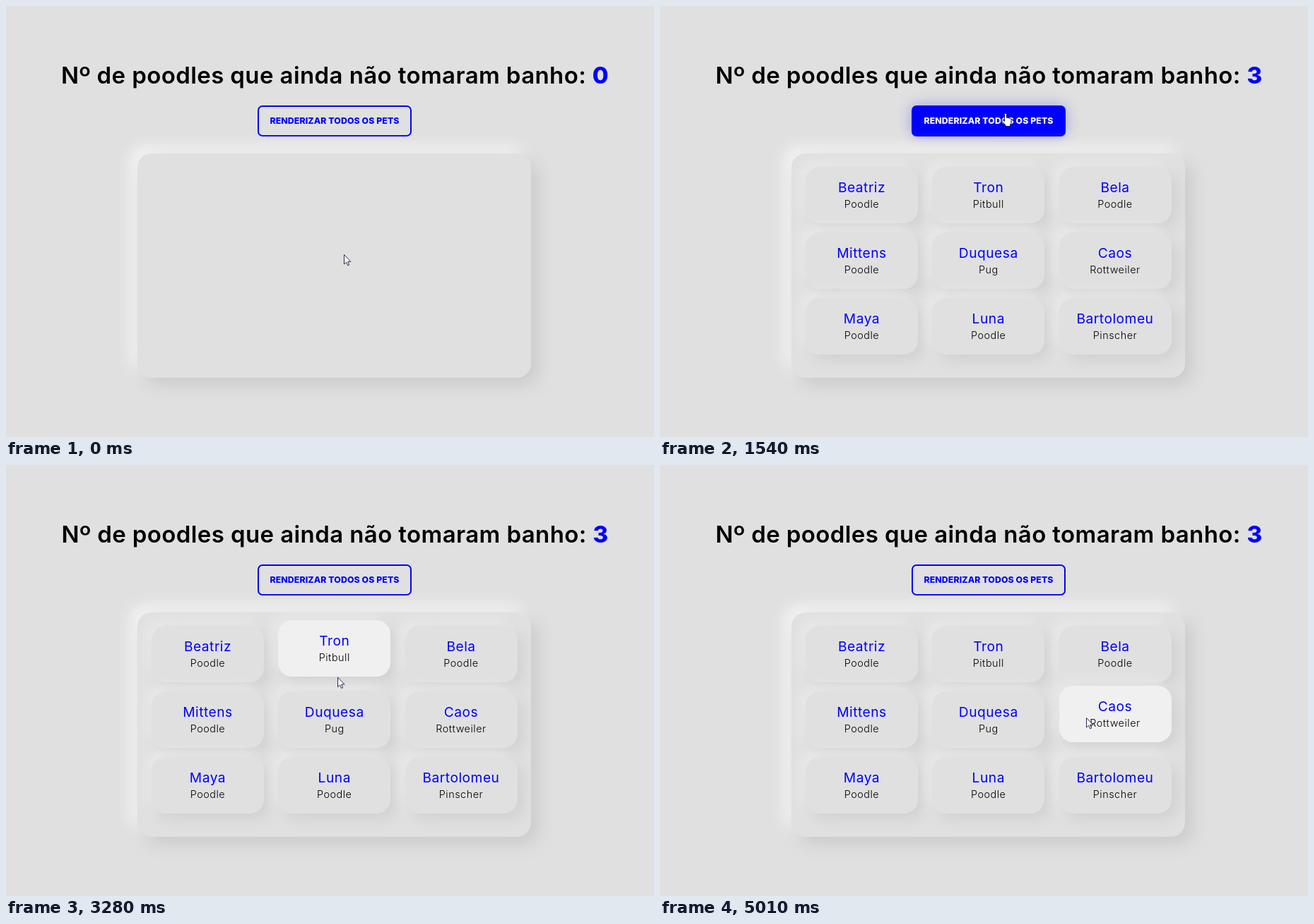
An HTML page for the animation above (5.27 s loop, 917 by 611 pixels).

```html
<!DOCTYPE html>
<html lang="pt-BR">
<head>
<meta charset="utf-8">
<title>Pets</title>
<style>
  html, body { margin: 0; width: 100%; height: 100%; overflow: hidden; background: #e0e0e0; }
  body { position: relative; font-family: Inter, "Open Sans", sans-serif; color: #000; }
  h1, button, .panel, .card, .pointer, .pointer svg { position: absolute; box-sizing: border-box; }
  h1 {
    left: 0; top: 78px; width: 931px; margin: 0; text-align: center; white-space: nowrap;
    font-size: 33px; font-weight: 600; line-height: 40px; letter-spacing: .4px;
  }
  h1 b { color: #00f; font-weight: 800; }
  button {
    left: 356px; top: 141px; width: 218px; height: 44px; padding: 0; border: 2px solid #00f;
    border-radius: 7px; background: transparent; color: #00f; white-space: nowrap;
    font: 800 12.3px/40px Inter, "Open Sans", sans-serif; letter-spacing: .1px;
  }
  .panel {
    left: 186px; top: 209px; width: 557px; height: 318px; border-radius: 20px; background: #e0e0e0;
    box-shadow: 10px 10px 24px #cacaca, -10px -10px 20px #f4f4f4;
  }
  .card {
    width: 159px; height: 80px; border-radius: 20px; background: #e0e0e0; text-align: center;
    box-shadow: 8px 8px 20px #d0d0d0, -8px -8px 16px #e9e9e9;
  }
  .name { margin-top: 17px; font-size: 19.2px; line-height: 24px; letter-spacing: .5px; color: #00f; }
  .breed { margin-top: 2px; font-size: 14.4px; line-height: 20px; letter-spacing: .5px; font-weight: 300; }
  .pointer { left: 0; top: 0; }
  .pointer svg { left: 0; top: 0; overflow: visible; }
  .pointer path { fill: #fff; stroke: #14143c; stroke-width: .9; stroke-linejoin: round; }
</style>
</head>
<body>
<h1 id="before">Nº de poodles que ainda não tomaram banho: <b>0</b></h1>
<h1 id="after">Nº de poodles que ainda não tomaram banho: <b>3</b></h1>
<button id="render" tabindex="-1">RENDERIZAR TODOS OS PETS</button>
<div class="panel"><div id="grid"></div></div>
<div class="pointer" id="pointer">
  <svg id="arrow" width="12" height="18"><path d="M.5 .5V14L3.6 11.2L5.6 15.8L7.6 15L5.7 10.4H9.8Z"/></svg>
  <svg id="hand" width="16" height="20"><path transform="translate(-6.5 -.5)"
    d="M5 12V2a1.5 1.5 0 0 1 3 0V7q1.4-.8 2.2.3q1.6-.7 2.3.6q1.8-.5 2 1.2V13q0 2-1.4 3.5V19H6.5V17.5L2 12.5q-1.2-1.6.1-2.4q1.2-.6 2.9 1.9Z"/></svg>
</div>
<script>
const LOOP = 5270, FADE = 500, RENDER = 1440;
const $ = id => document.getElementById(id);

// steps: [ms, properties, easing towards the next step]
function play(el, steps) {
  const first = steps[0], last = steps[steps.length - 1];
  const all = [[0, first[1]], ...steps, [LOOP, last[1]]];
  el.animate(
    all.map(([ms, props, easing = 'linear']) => ({ ...props, offset: ms / LOOP, easing })),
    { duration: LOOP, iterations: Infinity }
  );
}

// Hard switches of visibility at the given times
function toggle(el, visible, ...times) {
  const steps = [];
  for (const ms of times) {
    steps.push([ms, { opacity: +visible }]);
    visible = !visible;
    steps.push([ms, { opacity: +visible }]);
  }
  play(el, steps);
}

function hover(el, off, on, enter, leave) {
  const steps = [[enter, off, 'ease'], [enter + FADE, on]];
  if (leave) steps.push([leave, on, 'ease'], [leave + FADE, off]);
  play(el, steps);
}

const pets = [
  ['Beatriz', 'Poodle'], ['Tron', 'Pitbull', 2630, 3390], ['Bela', 'Poodle'],
  ['Mittens', 'Poodle'], ['Duquesa', 'Pug', 3400, 4230], ['Caos', 'Rottweiler', 4240],
  ['Maya', 'Poodle'], ['Luna', 'Poodle'], ['Bartolomeu', 'Pinscher']
];

function addLine(card, type, text) {
  const line = document.createElement('div');
  line.className = type;
  line.textContent = text;
  card.append(line);
  return line;
}

pets.forEach(([name, breed, enter, leave], i) => {
  const card = document.createElement('div');
  card.className = 'card';
  card.style.left = 20 + (i % 3) * 179.25 + 'px';
  card.style.top = 19 + Math.floor(i / 3) * 93 + 'px';
  addLine(card, 'name', name);
  const label = addLine(card, 'breed', breed);
  $('grid').append(card);
  if (!enter) return;

  hover(card,
    { transform: 'translateY(0)', backgroundColor: '#e0e0e0' },
    { transform: 'translateY(-8px)', backgroundColor: '#f0f0f0' },
    enter, leave);
  const tint = [];
  for (const ms of [enter, leave]) {
    if (!ms) continue;
    tint.push([ms, { color: '#000' }], [ms + 120, { color: '#404080' }],
      [ms + 250, { color: '#404080' }], [ms + FADE, { color: '#000' }]);
  }
  play(label, tint);
});

hover($('render'),
  { color: '#00f', backgroundColor: 'rgba(0,0,255,0)', borderColor: 'rgba(0,0,255,1)',
    boxShadow: '0 0 20px rgba(0,0,255,0)' },
  { color: '#fff', backgroundColor: 'rgba(0,0,255,1)', borderColor: 'rgba(0,0,255,0)',
    boxShadow: '0 0 20px rgba(0,0,255,.3)' },
  720, 2250);

toggle($('before'), true, RENDER);
toggle($('after'), false, RENDER);
toggle($('grid'), false, RENDER);
toggle($('arrow'), true, 700, 2250);
toggle($('hand'), false, 700, 2250);

const path = [
  [20, 478, 352], [280, 480, 300], [530, 484, 217], [700, 490, 181], [780, 491, 160],
  [1050, 489, 152], [2120, 489, 152], [2250, 488, 185], [2630, 474, 228], [2780, 471, 262],
  [3170, 470, 287], [3400, 468, 315], [3630, 466, 350], [3740, 466, 352], [4100, 482, 355],
  [4230, 548, 357], [4300, 600, 358], [4760, 603, 358]
];
play($('pointer'), path.map(([ms, x, y]) => [ms, { transform: `translate(${x}px, ${y}px)` }]));
</script>
</body>
</html>
```
